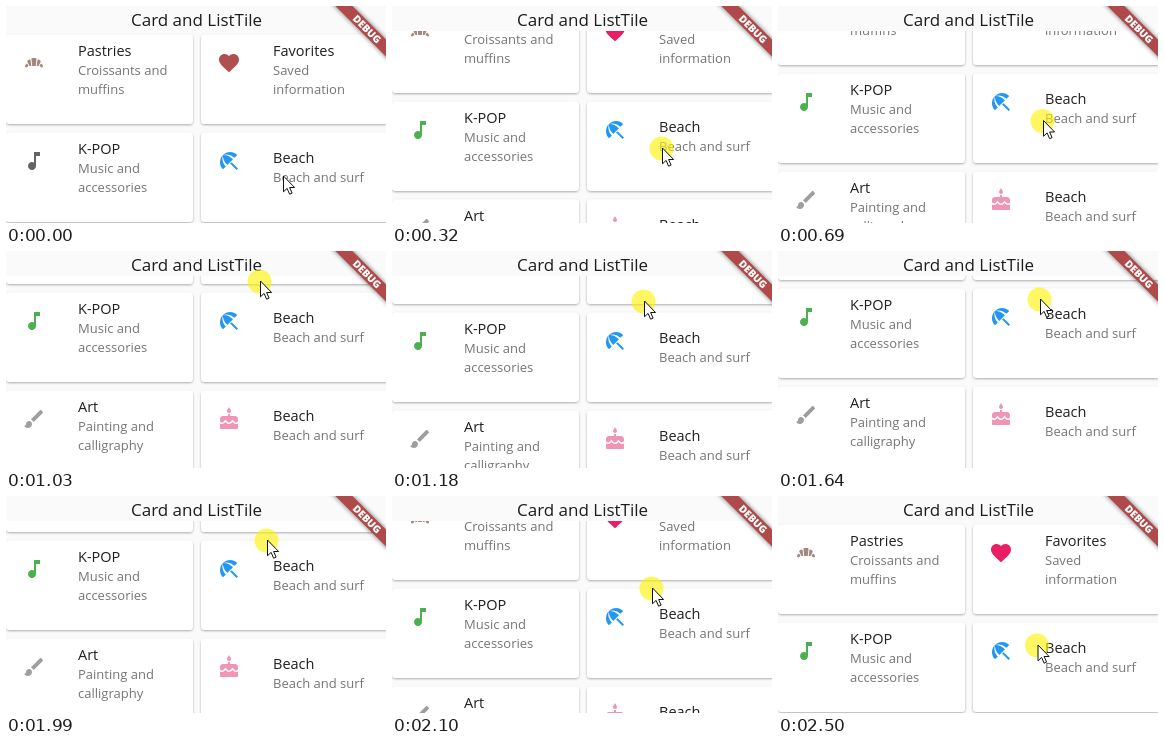
Recreate the animation shown at these times as an HTML page. Size 380 px wide and 217 px high, loop 2.57 s.

```html
<!DOCTYPE html>
<html lang="en">
<head>
<meta charset="utf-8">
<title>Card and ListTile</title>
<style>
  html, body { margin: 0; width: 100%; height: 100%; overflow: hidden; background: #fafafa; }
  svg { display: block; width: 100%; height: 100%; font-family: "Open Sans", "Noto Sans", sans-serif; }
  .head { font-size: 17px; fill: #1c1c1c; }
  .title { font-size: 14.5px; fill: #202020; }
  .sub { font-size: 13px; fill: #757575; }
  .debug { font-size: 10.2px; font-weight: 800; fill: #fff; text-anchor: middle; }
</style>
</head>
<body>
<svg viewBox="0 0 380 217" preserveAspectRatio="xMidYMid meet">
  <defs>
    <clipPath id="viewport"><rect y="25" width="380" height="192"/></clipPath>
    <filter id="cardShadow" x="-5%" y="-10%" width="110%" height="120%">
      <feDropShadow dx="0" dy="1" stdDeviation="0.9" flood-color="#000" flood-opacity="0.32"/>
    </filter>
    <filter id="blur" x="-20%" y="-100%" width="140%" height="300%">
      <feGaussianBlur stdDeviation="2.8"/>
    </filter>
  </defs>
  <rect width="380" height="217" fill="#fafafa"/>
  <g clip-path="url(#viewport)"><g id="list"></g></g>
  <text class="head" x="125" y="20">Card and ListTile</text>
  <g transform="translate(385 -1) rotate(45)">
    <rect x="-50" y="28" width="100" height="12" filter="url(#blur)" opacity="0.55"/>
    <rect x="-50" y="28" width="100" height="12" fill="#b04a4a"/>
    <text class="debug" x="0" y="37.7">DEBUG</text>
  </g>
  <g id="pointer">
    <circle id="halo" cx="-0.5" cy="0.5" r="12" fill="#fff200" opacity="0.62"/>
    <path d="M0.5 0V15.8L4.1 12.4L6.6 18.2L9.1 17.1L6.6 11.5H11.6Z" fill="#fff" stroke="#111" stroke-width="1"/>
  </g>
</svg>
<script>
const LOOP = 2570;
const ROW_PITCH = 98;
const MAX_SCROLL = 90;

const ICONS = {
  croissant: "M19.28 16.34c-1.21-.89-1.82-1.34-1.82-1.34s.32-.59.96-1.78c.38-.59 1.22-.59 1.6 0l.81 1.26c.19.3.21.68.06 1l-.22.47c-.25.54-.91.72-1.39.39zm-14.56 0c-.48.33-1.13.15-1.39-.38l-.23-.47c-.15-.32-.13-.7.06-1l.81-1.26c.38-.59 1.22-.59 1.6 0 .65 1.18.97 1.77.97 1.77s-.61.45-1.82 1.34zm10.64-6.97c.09-.68.73-1.06 1.27-.75l1.59.9c.46.26.63.91.36 1.41L16.5 15h-1.8l.66-5.63zm-6.73 0L9.3 15H7.5l-2.09-4.08c-.27-.5-.1-1.15.36-1.41l1.59-.9c.53-.3 1.18.08 1.27.76zM13.8 15h-3.6l-.74-6.88c-.07-.59.35-1.12.88-1.12h3.3c.53 0 .94.53.88 1.12L13.8 15z",
  heart: "M12 21.35l-1.45-1.32C5.4 15.36 2 12.28 2 8.5 2 5.42 4.42 3 7.5 3c1.74 0 3.41.81 4.5 2.09C13.09 3.81 14.76 3 16.5 3 19.58 3 22 5.42 22 8.5c0 3.78-3.4 6.86-8.55 11.54L12 21.35z",
  note: "M12 3v10.55c-.59-.34-1.27-.55-2-.55-2.21 0-4 1.79-4 4s1.79 4 4 4 4-1.79 4-4V7h4V3h-6z",
  umbrella: "M13.127 14.56l1.43-1.43 6.44 6.443L19.57 21zm4.293-5.73l2.86-2.86c-3.95-3.95-10.35-3.96-14.3-.02 3.93-1.3 8.31-.25 11.44 2.88zM5.95 5.98c-3.94 3.95-3.93 10.35.02 14.3l2.86-2.86C5.7 14.29 4.65 9.91 5.95 5.98zm.02-.02l-.01.01c-.38 3.01 1.17 6.88 4.3 10.02l5.73-5.73c-3.13-3.13-7.01-4.68-10.02-4.3z",
  brush: "M7 14c-1.66 0-3 1.34-3 3 0 1.31-1.16 2-2 2 .92 1.22 2.49 2 4 2 2.21 0 4-1.79 4-4 0-1.66-1.34-3-3-3zm13.71-9.37l-1.34-1.34c-.39-.39-1.02-.39-1.41 0L9 12.25 11.75 15l8.96-8.96c.39-.39.39-1.02 0-1.41z",
  cake: "M12 6c1.11 0 2-.9 2-2 0-.38-.1-.73-.29-1.03L12 0l-1.71 2.97c-.19.3-.29.65-.29 1.03 0 1.1.9 2 2 2zm4.6 9.99l-1.07-1.08-1.08 1.07c-1.3 1.3-3.58 1.31-4.89 0l-1.07-1.07-1.09 1.07C6.75 16.64 5.88 17 4.96 17c-.73 0-1.4-.23-1.96-.61V21c0 .55.45 1 1 1h16c.55 0 1-.45 1-1v-4.61c-.56.38-1.23.61-1.96.61-.92 0-1.79-.36-2.44-1.01zM18 9h-5V7h-2v2H6c-1.66 0-3 1.34-3 3v1.54c0 1.08.88 1.96 1.96 1.96.52 0 1.02-.2 1.38-.57l2.14-2.13 2.13 2.13c.74.74 2.03.74 2.77 0l2.14-2.13 2.13 2.13c.37.37.86.57 1.38.57 1.08 0 1.96-.88 1.96-1.96V12c.01-1.66-1.33-3-2.99-3z"
};

const CARDS = [
  { icon: "croissant", color: "#a1887f", title: "Pastries", lines: ["Croissants and", "muffins"] },
  { icon: "heart", color: "#e91e63", idle: "#b04f50", title: "Favorites", lines: ["Saved", "information"] },
  { icon: "note", color: "#4caf50", idle: "#646464", title: "K-POP", lines: ["Music and", "accessories"] },
  { icon: "umbrella", color: "#2196f3", title: "Beach", lines: ["Beach and surf"] },
  { icon: "brush", color: "#9e9e9e", title: "Art", lines: ["Painting and", "calligraphy"] },
  { icon: "cake", color: "#f095b4", title: "Beach", lines: ["Beach and surf"] }
];

// Each drag: start time, step length, grab line, pointer positions [x, y].
// The list follows the pointer: scroll = grab - y, within its limits.
const DRAGS = [
  { start: 0, step: 80, grab: 170, path: [[277, 170]] },
  { start: 80, step: 77.5, grab: 173, path: [[276, 169], [274, 161], [272, 151], [270, 142], [268, 135]] },
  { start: 690, step: 85, grab: 173, path: [[265, 114.5], [259, 65], [254, 24]] },
  { start: 1030, step: 76, grab: 115, path: [[254, 30], [252, 50], [251, 78], [251, 108], [252, 132], [253, 146]] },
  { start: 1560, step: 77, grab: 137, path: [[257, 97], [262, 48], [262, 38], [262, 37]] },
  { start: 1868, step: 76, grab: 126, path: [[262, 37], [261, 44], [260, 67]] },
  { start: 2100, step: 76.6, grab: 126, path: [[260, 92], [259, 116], [259, 134], [259.5, 145]] },
  { start: 2500, step: 70, grab: 149, path: [[259.5, 149]] }
];

const byId = id => document.getElementById(id);
const list = byId("list"), pointer = byId("pointer"), halo = byId("halo");

function add(parent, tag, attrs, text) {
  const node = document.createElementNS("http://www.w3.org/2000/svg", tag);
  for (const key in attrs) node.setAttribute(key, attrs[key]);
  if (text) node.textContent = text;
  parent.appendChild(node);
  return node;
}

CARDS.forEach((card, i) => {
  const x = (i % 2) * 195;
  const y = Math.floor(i / 2) * ROW_PITCH;
  const group = add(list, "g", { transform: `translate(${x} ${y})` });
  add(group, "rect", { y: 28.5, width: 187, height: 89.5, rx: 4, fill: "#fff", filter: "url(#cardShadow)" });
  card.shape = add(group, "path", { d: ICONS[card.icon], transform: "translate(16 45)" });
  const base = card.lines.length > 1 ? 50 : 59;
  add(group, "text", { class: "title", x: 72, y: base }, card.title);
  card.lines.forEach((line, n) =>
    add(group, "text", { class: "sub", x: 72, y: base + 19 + n * 19.3 }, line));
});

function render(time) {
  const drag = DRAGS.findLast(d => d.start <= time);
  const index = Math.floor((time - drag.start) / drag.step + 0.01);
  const [x, y] = drag.path[Math.min(index, drag.path.length - 1)];
  const scroll = Math.max(0, Math.min(MAX_SCROLL, Math.round(drag.grab - y)));
  const pressed = time >= DRAGS[1].start;
  list.setAttribute("transform", `translate(0 ${-scroll})`);
  pointer.setAttribute("transform", `translate(${x} ${y})`);
  halo.style.display = pressed ? "" : "none";
  for (const card of CARDS) card.shape.setAttribute("fill", pressed ? card.color : card.idle || card.color);
}

const begin = performance.now();
function tick() {
  render((performance.now() - begin) % LOOP);
  requestAnimationFrame(tick);
}
tick();
</script>
</body>
</html>
```
